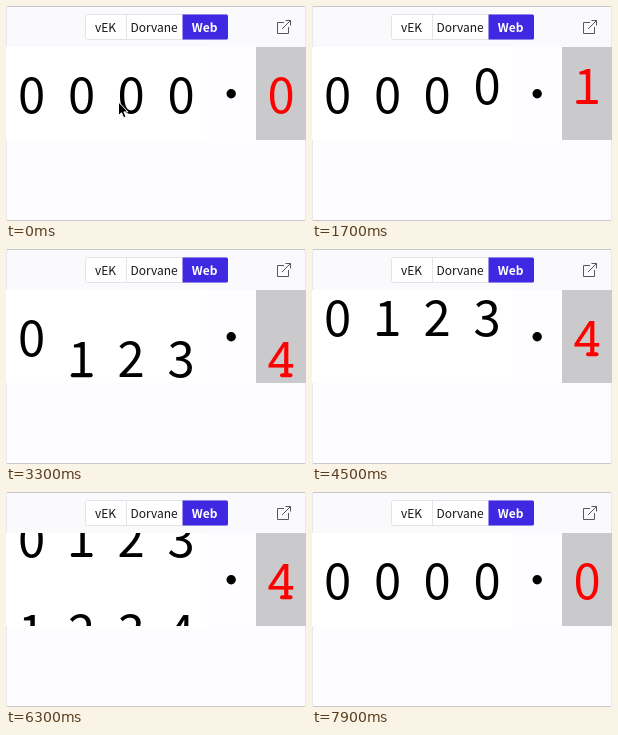
An HTML page for the animation above (8 s loop, 300 by 215 pixels).

```html
<!DOCTYPE html>
<html lang="en">
<head>
<meta charset="utf-8">
<title>Rolling counter</title>
<style>
  html, body { margin: 0; width: 100%; height: 100%; overflow: hidden; background: #fdfcff; }
  svg { display: block; width: 100vw; height: 100vh; }
  text { font-family: "Noto Sans CJK SC", "Noto Sans CJK JP", "Noto Sans", sans-serif; text-anchor: middle; }
  .tab { font-size: 12px; fill: #16161a; }
  .active { font-weight: 700; fill: #fff; }
  .digit { font-size: 49px; }
  .foot { fill: none; stroke-width: 4; stroke-linecap: round; }
</style>
</head>
<body>
<svg viewBox="0 0 300 215">
  <defs>
    <clipPath id="window"><rect y="41" width="300" height="93"/></clipPath>
  </defs>
  <rect width="300" height="215" fill="#fdfcff"/>
  <rect width="300" height="41" fill="#faf9fc"/>
  <path d="M0 .5H300M0 214.5H300" stroke="#c9c8cc"/>
  <path d="M.5 0V215M299.5 0V215" stroke="#e9e8ec"/>

  <rect x="79.5" y="8.5" width="142" height="25" rx="2" fill="#fff" stroke="#e4e3e8"/>
  <path d="M120.5 9V33" stroke="#e4e3e8"/>
  <path d="M176.500 8.500H220.500Q222 8.500 222 10V32Q222 33.500 220.500 33.500H176.500Z" fill="#3f28e2"/>
  <text class="tab" x="99.5" y="25.500">vEK</text>
  <text class="tab" x="148" y="25.500">Dorvane</text>
  <text class="tab active" x="198.700" y="25.500">Web</text>
  <path d="M278 16.500H271.500V27.500H282.500V21M276 23L284.500 14.500M279.500 14.500H284.500V19.500" fill="none" stroke="#58585c"/>

  <rect y="41" width="200" height="93" fill="#fff"/>
  <rect x="200" y="41" width="50" height="93" fill="#fefdff"/>
  <rect x="250" y="41" width="50" height="93" fill="#cac9cb"/>
  <g id="wheels" clip-path="url(#window)"></g>
  <circle cx="225.200" cy="87.800" r="4.700"/>
  <path id="cursor" d="M112.500 96V109.500L115.500 106.700L117.700 111.700L120 110.700L117.900 105.900H122Z" stroke="#fff" stroke-width="1"/>
</svg>
<script>
const LOOP = 8000, STEP = 100, ROLL = 250, PITCH = 93, BASELINE = 107.3;
const CURSOR_GONE = 1000, UNDO_START = 6171, UNDO_GAP = 135;
const centers = [25.7, 75.7, 125, 175.2, 275];

// Slab serifs under the digits that have one: left and right end from the centre.
const feet = { 1: [-9, 9], 4: [1, 9.5] };

// Each change gives the new digit for every wheel.
const changes = [
  [911, "00001"], [1627, "00012"], [2197, "00123"], [3146, "01234"], [4405, "12344"],
  ...["01234", "00123", "00012", "00001", "00000"].map((digits, i) => [UNDO_START + i * UNDO_GAP, digits])
];

function make(tag, parent, attrs) {
  const node = document.createElementNS("http://www.w3.org/2000/svg", tag);
  for (const key in attrs) node.setAttribute(key, attrs[key]);
  return parent.appendChild(node);
}

const wheels = centers.map((x, column) => {
  const color = column === 4 ? "#f00" : "#000";
  const wheel = make("g", document.getElementById("wheels"), { fill: color, stroke: "none" });
  for (let digit = 0; digit < 5; digit++) {
    const y = BASELINE + digit * PITCH;
    make("text", wheel, { x, y, class: "digit" }).textContent = digit;
    if (feet[digit]) {
      const [left, right] = feet[digit];
      make("path", wheel, { class: "foot", stroke: color, d: `M${x + left} ${y - 2}H${x + right}` });
    }
  }
  return wheel;
});
const cursor = document.getElementById("cursor");

function ease(u) {
  u = Math.min(1, Math.max(0, u));
  return u < 0.5 ? 4 * u ** 3 : 1 - 4 * (1 - u) ** 3;
}

// A new target interrupts the running roll and restarts the easing from there.
function position(column, time) {
  let from = 0, target = 0, start = 0;
  const at = t => from + (target - from) * ease((t - start) / ROLL);
  for (const [when, digits] of changes) {
    const next = Number(digits[column]);
    if (when > time) break;
    if (next === target) continue;
    from = at(when);
    target = next;
    start = when;
  }
  return at(time);
}

function draw(time) {
  wheels.forEach((wheel, column) =>
    wheel.setAttribute("transform", `translate(0 ${-position(column, time) * PITCH})`));
  cursor.setAttribute("visibility", time < CURSOR_GONE ? "visible" : "hidden");
}

const began = performance.now();
function tick() {
  const elapsed = performance.now() - began;
  draw(Math.floor((elapsed + 1) / STEP) * STEP % LOOP);
  requestAnimationFrame(tick);
}
tick();
</script>
</body>
</html>
```
